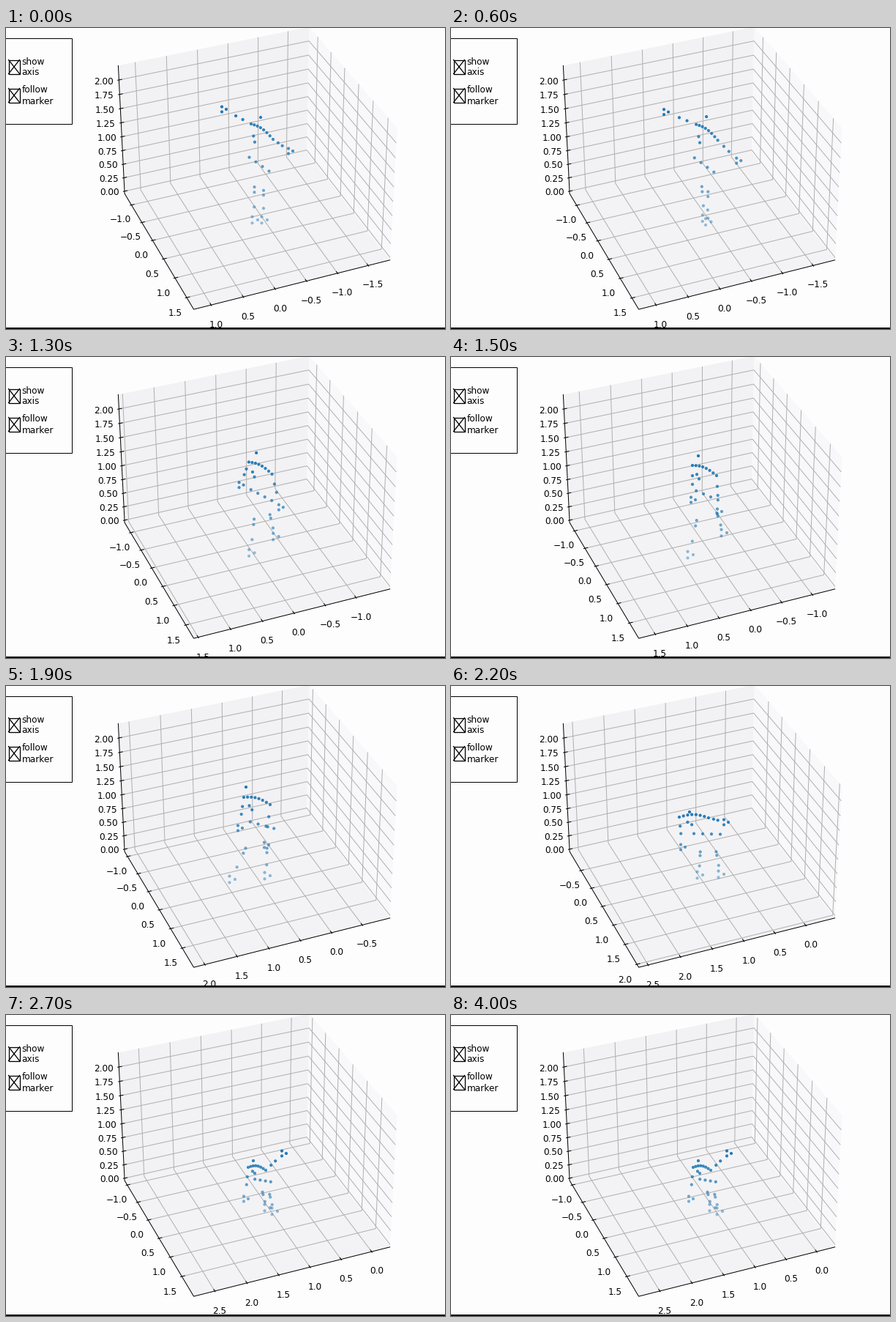
Animation, 600 px wide and 411 px high, one loop 4100 ms. Source, as a matplotlib script:

```python
import numpy as np
import matplotlib.pyplot as plt
from matplotlib.animation import FuncAnimation
from matplotlib.collections import LineCollection, PolyCollection
from matplotlib.colors import to_rgb
from matplotlib.patches import Rectangle

W, H, DPI = 600, 411, 96
PX = 72 / DPI                      # one pixel in points
FONT = dict(family="DejaVu Sans", fontsize=12.1 * PX, color="black")
PAPER = "#fdfdfe"

# Camera
ELEV, TURN = np.radians(34), np.radians(22)
SCALE, DIST, CX, CY = 2396, 10, 338.6, 183.8
HALF = 0.5714                      # half the box width
EDGE = 25 / 24                     # panes lie a little outside the limits
PAD = EDGE + 0.123                 # distance of the tick labels
TICK = (EDGE - 0.033, EDGE + 0.017)
REACH, Z_TOP = 1.5, 2.2

# Joints of the figure at the key times
KEY_TIMES = [0, 1.0, 1.5, 1.9, 2.2, 2.7]
JOINTS = {
    "head": [(348, 122), (347, 124), (338, 135), (328, 138), (326, 172), (338, 199)],
    "l_shoulder": [(335, 131), (334, 136), (330, 148), (325, 152), (312, 179), (331, 208)],
    "r_shoulder": [(365, 152), (364, 156), (363, 162), (361, 162), (352, 180), (355, 212)],
    "l_hand": [(297, 111), (300, 136), (330, 195), (319, 194), (316, 220), (327, 251)],
    "r_hand": [(388, 168), (388, 195), (366, 211), (355, 217), (375, 186), (379, 189)],
    "waist": [(346, 186), (347, 188), (350, 189), (350, 190), (350, 202), (351, 226)],
    "l_foot": [(339, 262), (345, 261), (326, 270), (308, 264), (339, 258), (356, 263)],
    "r_foot": [(352, 262), (355, 260), (372, 240), (356, 259), (368, 257), (366, 268)],
}
BODY = np.array(list(JOINTS.values()), float).swapaxes(0, 1)

# Centre of the view on the floor; it starts to follow a little later
VIEW_TIMES = [0.4] + KEY_TIMES[1:]
VIEWS = [(-0.295, 0.23), (-0.213, 0.21), (0.191, 0.32),
         (0.608, 0.42), (1.082, 0.513), (1.262, 0.435)]


def project(u, v, w):
    """Box coordinates in [-1, 1] to stage pixels."""
    a, b, c = HALF * u, HALF * v, 0.75 * HALF * w
    side = a * np.cos(TURN) + b * np.sin(TURN)
    front = b * np.cos(TURN) - a * np.sin(TURN)
    depth = DIST - np.cos(ELEV) * front - np.sin(ELEV) * c
    rise = np.cos(ELEV) * c - np.sin(ELEV) * front
    return CX + SCALE * side / depth, CY - SCALE * rise / depth


def path(*points):
    return [project(*p) for p in points]


def glide(t, times, values):
    """Smooth cubic motion through key values, at rest at both ends."""
    times, values = np.asarray(times), np.asarray(values, float)
    t = np.clip(t, times[0], times[-1])
    slope = np.gradient(values, times, axis=0)
    slope[0] = slope[-1] = 0
    i = min(np.searchsorted(times, t, "right") - 1, len(times) - 2)
    h = times[i + 1] - times[i]
    s = (t - times[i]) / h
    ease = s * s * (3 - 2 * s)
    return (values[i] * (1 - ease) + values[i + 1] * ease
            + h * slope[i] * s * (1 - s) ** 2
            - h * slope[i + 1] * s * s * (1 - s))


def along(a, b, *fractions):
    return [a + f * (b - a) for f in fractions]


def cluster(centre, radius):
    angles = np.arange(3) * 2 * np.pi / 3
    return list(centre + radius * np.column_stack([np.cos(angles), np.sin(angles)]))


def markers(t):
    """Marker positions on the figure's bones."""
    j = dict(zip(JOINTS, glide(t, KEY_TIMES, BODY)))
    left, right, waist = j["l_shoulder"], j["r_shoulder"], j["waist"]
    span = right - left
    points = [j["head"]]
    for f in np.linspace(0, 1, 8):
        points.append(left + f * span - (0, 4 * np.sin(np.pi * f)))
    points += along(left, waist, 0.3, 0.45)
    points += along(waist - 0.45 * span, waist + 0.45 * span, *np.linspace(0, 1, 4))
    for side, shoulder, sign in (("l", left, -1), ("r", right, 1)):
        hand, foot = j[side + "_hand"], j[side + "_foot"]
        hip = waist + sign * 0.2 * span
        points += along(shoulder, hand, 0.3, 0.55) + cluster(hand, 4)
        points += along(hip, foot, 0.44, 0.53, 0.78) + cluster(foot, 5)
    return np.array(points)


def ticks(centre):
    first = np.ceil((centre - REACH) / 0.5)
    last = np.floor((centre + REACH) / 0.5)
    return [k * 0.5 for k in range(int(first), int(last) + 1)]


def number(value, digits):
    return f"{value:.{digits}f}".replace("-", "\u2212")


def scaffold(cx, cy):
    """Grid lines, tick marks and labels for a view centre."""
    grid, marks, labels = [], [], []
    near, far = TICK
    e = EDGE
    for x in ticks(cx):
        u = (cx - x) / REACH
        grid.append(path((u, e, -e), (u, -e, -e), (u, -e, e)))
        marks.append(path((u, near, -e), (u, far, -e)))
        labels.append((project(u, PAD, -PAD), number(x, 1)))
    for y in ticks(cy):
        v = (y - cy) / REACH
        grid.append(path((-e, v, -e), (e, v, -e), (e, v, e)))
        marks.append(path((-near, v, -e), (-far, v, -e)))
        labels.append((project(-PAD, v, -PAD), number(y, 1)))
    for z in np.arange(9) * 0.25:
        w = 2 * z / Z_TOP - 1
        grid.append(path((-e, -e, w), (e, -e, w), (e, e, w)))
        marks.append(path((-near, -e, w), (-far, -e, w)))
        labels.append((project(-PAD, -PAD, w), number(z, 2)))
    return grid, marks, labels


fig = plt.figure(figsize=(W / DPI, H / DPI), dpi=DPI, facecolor=PAPER)
ax = fig.add_axes([0, 0, 1, 1])
ax.set_xlim(0, W)
ax.set_ylim(H, 0)
ax.axis("off")

# Panes and axis lines
E = EDGE
floor = path((-E, -E, -E), (-E, E, -E), (E, E, -E), (E, -E, -E))
back = path((-E, -E, -E), (E, -E, -E), (E, -E, E), (-E, -E, E))
side = path((E, -E, -E), (E, E, -E), (E, E, E), (E, -E, E))
ax.add_collection(PolyCollection(
    [floor, back, side], facecolors=["#f3f3f5", "#f2f1f3", "#f8f8fa"],
    edgecolors="none", zorder=1), autolim=False)
frame_line = path((-E, -E, E), (-E, -E, -E), (-E, E, -E), (E, E, -E))
ax.plot(*zip(*frame_line), color="black", lw=PX, zorder=3)

grid_lines = LineCollection([], colors="#b0b0b0", linewidths=PX, zorder=2)
tick_marks = LineCollection([], colors="black", linewidths=PX, zorder=3)
for lines in (grid_lines, tick_marks):
    ax.add_collection(lines, autolim=False)
texts = [ax.text(0, 0, "", ha="center", va="top", zorder=4, **FONT)
         for _ in range(24)]
dots = ax.scatter(*markers(0).T, s=(4.2 * PX) ** 2, linewidths=0, zorder=5)


def check_box(y, label):
    x, w, half = 3.5, 15, 9.5
    style = dict(lw=1.3 * PX, zorder=7)
    ax.add_patch(Rectangle((x, y - half), w, 2 * half, fc=PAPER, ec="black", **style))
    for d in (-half, half):
        ax.plot([x, x + w], [y + d, y - d], color="black", **style)
    ax.text(21.5, y + 0.5, label, ha="left", va="center", zorder=8, **FONT)


ax.add_patch(Rectangle((-1, 13.5), 90.5, 117, fc=PAPER, ec="black",
                       lw=PX, zorder=6))
check_box(53, "show\naxis")
check_box(92, "follow\nmarker")
ax.plot([-1, W + 1], [H - 1, H - 1], color="black", lw=2 * PX, zorder=9)


def draw(frame):
    # The motion pauses for one frame early on and rests at the end.
    t = (3 if frame == 4 else min(frame, 27)) / 10

    grid, marks, labels = scaffold(*glide(t, VIEW_TIMES, VIEWS))
    grid_lines.set_segments(grid)
    tick_marks.set_segments(marks)
    for text in texts:
        text.set_text("")
    for text, ((x, y), value) in zip(texts, labels):
        text.set_position((x, y + 0.4))
        text.set_text(value)

    # Markers fade towards the floor.
    points = markers(t)
    y = points[:, 1]
    colors = np.empty((len(points), 4))
    colors[:, :3] = to_rgb("#1f77b4")
    colors[:, 3] = 1 - 0.55 * (y - y.min()) / np.ptp(y)
    dots.set_offsets(points)
    dots.set_facecolors(colors)
    return [grid_lines, tick_marks, dots, *texts]


anim = FuncAnimation(fig, draw, frames=41, interval=100, repeat=True)
plt.show()
```
